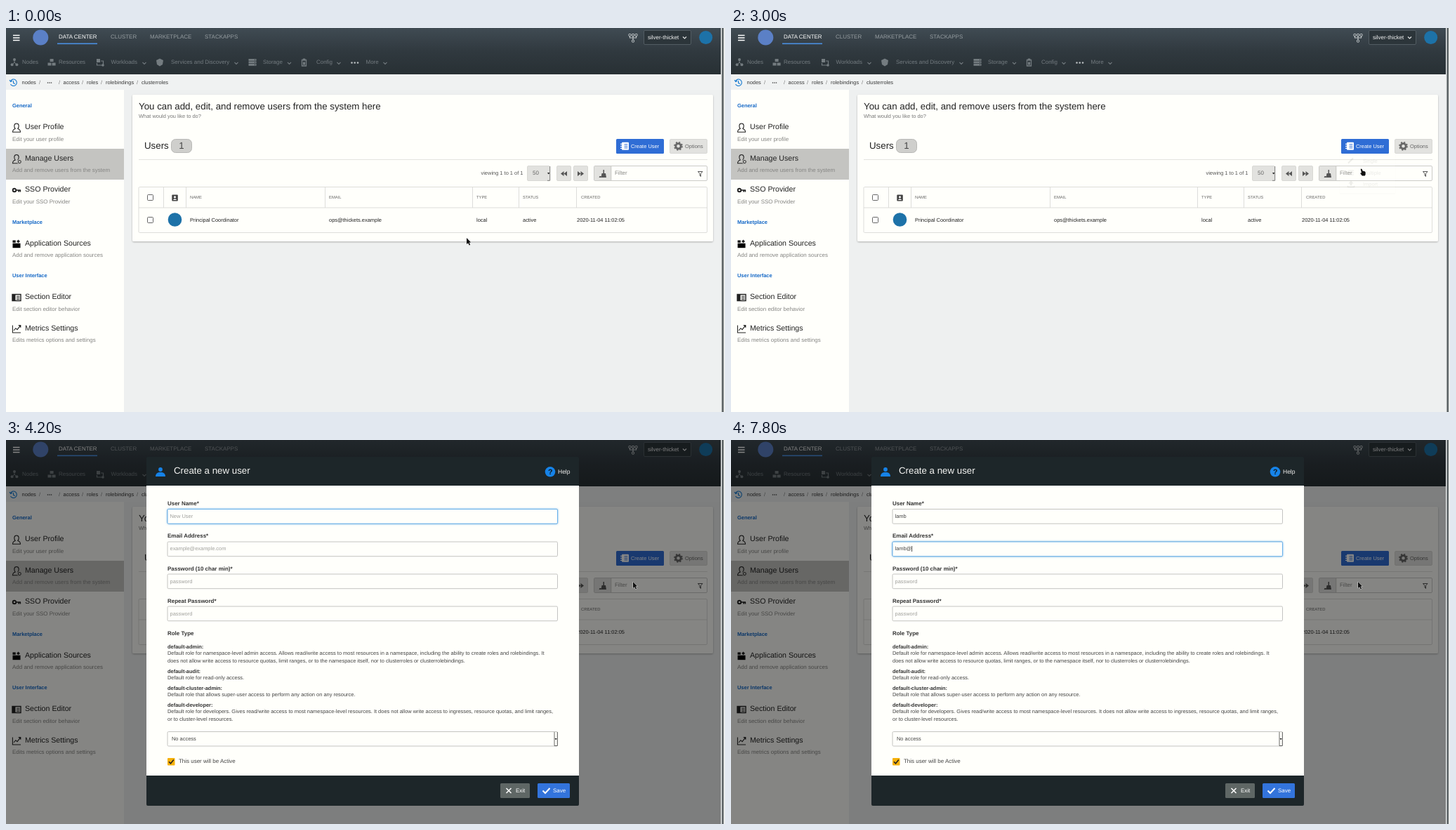
Animation, 1024 px wide and 547 px high, one loop 8000 ms. Source, as an HTML page:

```html
<!DOCTYPE html>
<html lang="en">
<head>
<meta charset="utf-8">
<title>User administration</title>
<style>
html, body { margin: 0; width: 100%; height: 100%; overflow: hidden; background: #eef0f0; }
svg { display: block; width: 1024px; height: 547px; }
text { font-family: "Liberation Sans", Arial, sans-serif; text-rendering: geometricPrecision; white-space: pre; }
</style>
</head>
<body>
<svg id="stage" viewBox="0 0 1024 547" xmlns="http://www.w3.org/2000/svg"></svg>
<script>
const LOOP = 8000;
const S = 7.45, M = 7.98, L = 10.64, XL = 13.3;
const INK = '#222', GREY = '#858583', PAPER = '#fffffb', BLUE = '#1468c7';

const text = (x, y, s, size = S, fill = INK, extra = '') =>
  `<text x="${x}" y="${y}" font-size="${size}" fill="${fill}" ${extra}>${s}</text>`;
const bold = (x, y, s, size = S, fill = INK) => text(x, y, s, size, fill, 'font-weight="700"');
const rect = (x, y, w, h, fill, extra = '') =>
  `<rect x="${x}" y="${y}" width="${w}" height="${h}" fill="${fill}" ${extra}/>`;
const box = (x, y, w, h, stroke = '#c6c6c3', fill = 'none', r = 1.5) =>
  rect(x, y, w, h, fill, `rx="${r}" stroke="${stroke}" stroke-width=".9"`);
const line = (d, stroke = INK, w = 1, extra = '') =>
  `<path d="${d}" fill="none" stroke="${stroke}" stroke-width="${w}" ${extra}/>`;
const fill = (d, color = INK) => `<path d="${d}" fill="${color}"/>`;
const dot = (x, y, r, color = INK) => `<circle cx="${x}" cy="${y}" r="${r}" fill="${color}"/>`;
const at = (x, y, s) => `<g transform="translate(${x} ${y})">${s}</g>`;
const chevron = (x, y, c) => line(`M${x - 2.5} ${y - 1.2}l2.5 2.5l2.5-2.5`, c, 1.2);
const person = c => dot(0, -3, 2.9, c) + fill('M-7 7Q-7 2-2 1H2Q7 2 7 7Z', c);
const personLine = line('M-5.5 6.3Q-5.5 2.6-1.8 1.5Q-3.4-.6-3.2-3Q-2.8-6 0-6Q2.8-6 3.2-3Q3.4-.6 1.8 1.5Q5.5 2.6 5.5 6.3Z', INK, 1.1);
const gear = c => `<circle r="3.7" fill="none" stroke="${c}" stroke-width="2.8"/>` +
  `<circle r="5.6" fill="none" stroke="${c}" stroke-width="1.6" stroke-dasharray="2.2 2.2"/>`;
const listIcon = (c, back) => rect(-4, -5.5, 10, 11, c, 'rx="1"') +
  line('M-6-3H-3M-6 0H-3M-6 3H-3', c, 1.3) + line('M-.5-2.5H4.3M-.5 0H4.3M-.5 2.5H4.3', back, 1);

function header() {
  const nav = '#747c80';
  const tabs = [[149, 'CLUSTER'], [205, 'MARKETPLACE'], [283, 'STACKAPPS']];
  const items = [[23, 'Nodes'], [75, 'Resources'], [149.5, 'Workloads', 197], [235, 'Services and Discovery', 328],
    [366, 'Storage', 403.5], [442, 'Config', 474], [512.5, 'More', 540]];
  return rect(0, 0, 1018, 66, 'url(#bar)') +
    line('M10 10.5h9.5M10 14h9.5M10 17.5h9.5', '#fff', 1.6) +
    dot(49.3, 13.5, 11, '#5b80c6') +
    text(75, 15.3, 'DATA CENTER', M, '#fff') + rect(73, 21.5, 57, 1.6, '#4a90e2') +
    tabs.map(([x, s]) => text(x, 15.3, s, M, '#969da1')).join('') +
    items.map(([x, s, c]) => text(x, 51.3, s, M, nav) + (c ? chevron(c, 50, nav) : '')).join('') +
    at(12, 49, line('M0-4V0M-3 3L0 0L3 3', nav, 1) + dot(0, -4, 2, nav) + dot(-3.4, 3.2, 2, nav) + dot(3.4, 3.2, 2, nav)) +
    at(65, 49, rect(-2.4, -5, 5, 4, nav) + rect(-5.5, .5, 5, 4, nav) + rect(.6, .5, 5, 4, nav)) +
    at(134, 49, rect(-5, -5, 5, 5, nav) + line('M-4.5 1V4H4.5V-2H1', nav, 1.2) + dot(4, 4, 1.8, nav)) +
    at(219, 49, fill('M-5-3L0-5.5L5-3L4 3L0 5.5L-4 3Z', nav)) +
    at(351, 49, [-5, -1.5, 2].map(y => rect(-5.5, y, 11, 2.8, nav) + dot(3.5, y + 1.4, .7, '#2d3438')).join('')) +
    at(424.5, 49, line('M-3-3.5H3V5H-3Z', nav, 1.3) + rect(-1.7, -5.5, 3.4, 3, nav) + rect(-1.5, -.5, 3, 4, nav)) +
    [492.5, 496.7, 501].map(x => dot(x, 49.5, 1.3, '#b8bdbf')).join('') +
    at(893, 14, line('M0 5V0M-4.6-3.4V0H4.6V-3.4', '#c5cacc', 1.1) +
      [[-4.6, -4], [0, -4], [4.6, -4], [0, 4.6]].map(([x, y]) => box(x - 1.5, y - 1.5, 3, 3, '#c5cacc', '#39434a', .5)).join('') +
      line('M0-2.5V0', '#c5cacc', 1.1)) +
    box(908.5, 3.5, 67, 20, '#566067', '#2c353a') + text(914, 15.6, 'silver-thicket', M, '#f2f3f3') + chevron(966.5, 13.7, '#e2e4e4') +
    dot(996.7, 13.5, 9.5, '#1d72a8');
}

function crumbs() {
  const parts = [[22.5, 'nodes'], [47, '/'], [75, '/'], [81.5, 'access'], [108, '/'], [115, 'roles'],
    [135, '/'], [142, 'rolebindings'], [186, '/'], [193, 'clusterroles']];
  return rect(0, 66, 1018, 22, '#f0f2f2') +
    line('M6.5 75.5A4.7 4.7 0 1 1 6.5 80M10.5 75V78.3L12.8 79.5M5 74L6.6 76.5L9 75.2', '#1479d0', 1.1) +
    parts.map(([x, s]) => text(x, 79.7, s, S, s === '/' ? '#777' : '#3a3a3a')).join('') +
    [59.5, 62, 64.5].map(x => dot(x, 78, .8, '#333')).join('');
}

function sidebar() {
  const rows = [[141, 'User Profile', 'Edit your user profile'],
    [185.5, 'Manage Users', 'Add and remove users from the system'],
    [230, 'SSO Provider', 'Edit your SSO Provider'],
    [306.5, 'Application Sources', 'Add and remove application sources'],
    [383, 'Section Editor', 'Edit section editor behavior'],
    [427.5, 'Metrics Settings', 'Edits metrics options and settings']];
  const active = '#c4c4c1';
  const icons = [personLine,
    personLine + dot(4.3, 4, 3.2, active) + `<circle cx="4.3" cy="4" r="2" fill="none" stroke="#222"/>`,
    line('M-1 0H6M3 0V2.5M5.3 0V2.5', INK, 1.7) + `<circle cx="-3" r="2.3" fill="none" stroke="#222" stroke-width="1.9"/>`,
    rect(-5.5, -.8, 11, 6.5) + rect(-5.5, -5, 4.2, 3.2) + fill('M2.5-6L5-3.6L2.5-1.2L0-3.6Z'),
    line('M-6-4.5H6V4.5H-6Z', INK, 1.4) + rect(-6, -4.5, 4.5, 9, INK) + line('M0-1.8H4.5M0 .3H4.5M0 2.4H4.5'),
    line('M-5.6-5V5.5H6M-4 2.5L-1.2-.8L1 1.2L5.5-4.6M2.7-4.9H5.8V-1.8', INK, 1.1)];
  return rect(0, 88, 168, 459, PAPER) + rect(0, 172, 168, 44, active) +
    [[113.2, 'General'], [278.5, 'Marketplace'], [355, 'User Interface']].map(([y, s]) => bold(9, y, s, S, BLUE)).join('') +
    rows.map(([y, a, b], i) => at(15, y + 1, icons[i]) + text(27, y + 3.1, a, L) + text(9, y + 19.8, b, M, GREY)).join('');
}

function card() {
  const head = '#666', cols = [224.5, 256.5, 454.5, 664.5, 730.5, 812.5];
  const heads = [[262, 'NAME'], [460, 'EMAIL'], [670, 'TYPE'], [736, 'STATUS'], [819, 'CREATED']];
  const cells = [[262, 'Principal Coordinator'], [460, 'ops@thickets.example'], [670, 'local'], [736, 'active'],
    [813, '2020-11-04 11:02:05']];
  const check = y => box(201.5, y, 8, 8, '#555', '#fff', 1);
  const button = (x, y, w, h) => box(x, y, w, h, '#d6d6d3', '#e2e2df');
  return rect(180, 95, 827, 209, PAPER, 'rx="2" filter="url(#soft)"') +
    text(189, 115.6, 'You can add, edit, and remove users from the system here', XL) +
    text(189, 128.4, 'What would you like to do?', S, '#777') +
    text(197, 171.5, 'Users', XL) + box(235.5, 158.5, 29, 19, '#b4b4b2', '#cfcfcc', 6) +
    text(250, 171.5, '1', XL, '#444', 'text-anchor="middle"') +
    rect(869, 158, 68, 21, '#2f6dd5', 'rx="1.5"') + at(881, 168.3, listIcon('#fff', '#2f6dd5')) + text(890, 170.6, 'Create User', S, '#fff') +
    button(945.5, 158.5, 53, 20) + at(957.5, 168.3, gear('#666')) + text(967, 170.6, 'Options', S, '#666') +
    line('M189 187.5H999', '#dcdcd9', .8) +
    text(676.5, 209, 'viewing 1 to 1 of 1', S, '#555') +
    button(742.5, 196.5, 32, 21) + text(750, 209.4, '50', M, '#666') + line('M771 217.3H774.7V197', '#666', .8) + fill('M771 206h3.4l-1.7 2.4Z') +
    button(784.5, 196.5, 20, 21) + fill('M794.5 204V211L790 207.5ZM799 204V211L794.5 207.5Z', '#555') +
    button(808.5, 196.5, 20, 21) + fill('M814 204V211L818.5 207.5ZM818.5 204V211L823 207.5Z', '#555') +
    box(837.5, 196.5, 161, 21, '#c6c6c3', PAPER) + rect(838, 197, 24, 20, '#e2e2df') + line('M861.8 197V217', '#c6c6c3') +
    fill('M850.5 202H852V207H854L855 213H847.5L848.5 207H850.5ZM844.5 213l1-2h2v2Z', '#555') +
    text(867, 209.4, 'Filter', M, '#8a8a88') +
    line('M985.5 204.5H992L989.5 207.5V211.5L988 210V207.5Z', '#555', 1) +
    box(189, 226.5, 809.5, 65, '#dadad7') + line('M189 256H998.5', '#dadad7', .9) +
    line(cols.map(x => `M${x} 226.5V256`).join(''), '#dadad7', .9) +
    check(237.5) + check(269.5) +
    rect(236.3, 237.5, 8.5, 9, '#444', 'rx="1"') + dot(240.5, 240.8, 1.5, '#fff') + fill('M237.8 245Q240.5 241.5 243.2 245Z', '#fff') +
    heads.map(([x, s]) => text(x, 243, s, 5.85, head)).join('') +
    dot(240.5, 273, 9.8, '#1d72a8') +
    cells.map(([x, s]) => text(x, 275.6, s)).join('');
}

function menu() {
  const ink = '#555';
  const rows = [[189.5, 'Single', line('M-4 3L3-4', ink, 2)],
    [206, 'Multiple', line('M-4-3H4M-4 0H4M-4 3H4', ink, 1.2)],
    [222.5, 'Import', fill('M0-5L3.5-1H1.3V2H-1.3V-1H-3.5Z', ink) + line('M-4.5 2V4H4.5V2', ink, 1.2)]];
  return rect(867, 180, 79, 55, PAPER, 'rx="1.5" filter="url(#soft)"') +
    rows.map(([y, s, icon]) => at(883, y, icon) + text(900, y + 2.6, s, S, ink)).join('');
}

function modal() {
  const dark = '#1d2629';
  const labels = [[93.3, 'User Name*'], [139.4, 'Email Address*'], [185.8, 'Password (10 char min)*'], [232, 'Repeat Password*'], [278, 'Role Type']];
  const roles = [[296.6, 'default-admin:'], [331.8, 'default-audit:'], [356, 'default-cluster-admin:'], [380.2, 'default-developer:']];
  const notes = [
    [305.8, 'Default role for namespace-level admin access. Allows read/write access to most resources in a namespace, including the ability to create roles and rolebindings. It'],
    [316.9, 'does not allow write access to resource quotas, limit ranges, or to the namespace itself, nor to clusterroles or clusterrolebindings.'],
    [341, 'Default role for read-only access.'],
    [365.1, 'Default role that allows super-user access to perform any action on any resource.'],
    [389.2, 'Default role for developers. Gives read/write access to most namespace-level resources. It does not allow write access to ingresses, resource quotas, and limit ranges,'],
    [400.4, 'or to cluster-level resources.']];
  return rect(200, 24, 616, 497, dark, 'rx="2"') + rect(200, 65, 616, 413, PAPER) +
    at(220, 45, person('#1683e8')) + text(239, 48.2, 'Create a new user', XL, '#f4f4f2') +
    dot(775, 45.3, 7.3, '#1683e8') + bold(772, 49.2, '?', 10.64, '#10181b') + text(786, 48.3, 'Help', 8.51, '#f4f4f2') +
    labels.map(([y, s]) => bold(230, y, s, M, '#333')).join('') +
    [98.5, 145, 191, 237].map(y => box(230, y, 555.5, 20.7, '#bebebb', PAPER)).join('') +
    '<g id="focus"><rect x="230" y="98.5" width="555.5" height="20.7" rx="1.5" fill="#fffffb" stroke="#66afe9" filter="url(#glow)"/></g>' +
    text(233.5, 111.2, '', S, INK, 'id="name"') + text(233.5, 157.4, '', S, INK, 'id="mail"') +
    [203.6, 249.6].map(y => text(233.5, y, 'password', S, '#a0a09d')).join('') +
    rect(0, 105, .8, 8, '#222', 'id="caret"') +
    roles.map(([y, s]) => bold(230, y, s, S, '#333')).join('') +
    notes.map(([y, s]) => text(230, y, s, S, '#444')).join('') +
    box(230, 415.5, 555.5, 20.5, '#bebebb', PAPER) + text(236, 428, 'No access', S, '#444') +
    line('M781 416V435.5H785.3V416', '#444', .8) + fill('M781.5 425h3.2l-1.6 2.2Z') +
    rect(230, 453, 10.5, 10.5, '#f6b10a', 'rx="1"') + line('M232 458.2L234.5 460.8L238.8 455.5', '#222', 1.5) +
    text(246, 460.4, 'This user will be Active', M, '#444') +
    rect(704, 489, 42, 21, '#5f6765', 'rx="1.5"') + line('M712.5 496L719.5 503M719.5 496L712.5 503', '#fff', 1.5) + text(726, 502, 'Exit', M, '#fff') +
    rect(757, 489, 46, 21, '#3374dc', 'rx="1.5"') + line('M764.5 499.5L768 503L774.5 496', '#fff', 2) + text(779, 502, 'Save', M, '#fff');
}

document.getElementById('stage').innerHTML = `<defs>
  <linearGradient id="bar" x2="0" y2="1"><stop stop-color="#404b53"/><stop offset=".5" stop-color="#30393f"/><stop offset="1" stop-color="#283034"/></linearGradient>
  <filter id="soft" x="-10%" y="-10%" width="120%" height="130%"><feDropShadow dx="0" dy="1" stdDeviation="1.3" flood-opacity=".28"/></filter>
  <filter id="glow" x="-2%" y="-30%" width="104%" height="160%"><feDropShadow dx="0" dy="0" stdDeviation="1.5" flood-color="#66afe9" flood-opacity=".8"/></filter>
  </defs>` +
  rect(0, 0, 1024, 547, '#eef0f0') + crumbs() + sidebar() + card() + header() +
  `<g id="menu">${menu()}</g>` + rect(0, 0, 1018, 547, '#000', 'id="shade"') + `<g id="modal">${modal()}</g>` +
  rect(1018, 0, 6, 547, '#e6e8e8') + rect(1019.5, 0, 2.5, 547, '#596062') +
  `<g id="arrow">${line('M0 0V9L2.1 7.2L3.7 10.6L5.2 9.9L3.7 6.6H6.3Z', '#fff', 1, 'opacity=".8"')}${fill('M0 0V9L2.1 7.2L3.7 10.6L5.2 9.9L3.7 6.6H6.3Z', '#111')}</g>` +
  `<g id="hand">${fill('M-1.3 0Q-.3-1.2.6 0L1.8 2.7Q5 2.4 5.6 4.2L5.7 7.6L4.8 9.5H.8L-1.7 6.3Q-1.8 5 0 5.5Z', '#111')}</g>`;

const el = Object.fromEntries([...document.querySelectorAll('g[id], rect[id], text[id]')].map(n => [n.id, n]));

// Each track: [start ms, values...], held until the next entry
const pointer = [[0, 656, 299], [100, 667, 297], [200, 676, 295], [700, 800, 270], [800, 987, 240], [900, 930, 223],
  [1100, 862, 197, 1], [1200, 870, 186], [1300, 881, 175, 1], [1400, 893, 166, 1], [1500, 905, 160, 1],
  [1900, 913, 166, 1], [2000, 921, 172, 1], [2200, 895, 172, 1], [2400, 930, 186, 1], [2500, 898, 201, 1],
  [3100, 898, 201], [4100, 895, 201], [4200, 893, 202]];
const menuFade = [[0, 0], [1700, .25], [1800, .6], [1900, .9], [2000, 1], [2900, .5], [3000, .1], [3100, 0]];
const modalFade = [[0, 0, 0], [3100, .25, .13], [3200, .965, .47], [3300, 1, .48]];
const nameKeys = [[0, 0], [4600, 1], [4900, 2], [5100, 4]];
const mailKeys = [[0, 0], [6500, 1], [6800, 2], [6900, 3], [7000, 4], [7800, 5]];
const caretOn = [[0, 1], [4100, 0], [4600, 1], [5400, 0], [5600, 1]];
const hold = (track, t) => track.filter(k => k[0] <= t).pop().slice(1);

function field(node, value, hint) {
  node.textContent = value || hint;
  node.setAttribute('fill', value ? '#444' : '#a0a09d');
}

function draw(t) {
  const [x, y, hand] = hold(pointer, t);
  el.arrow.setAttribute('opacity', hand ? 0 : 1);
  el.hand.setAttribute('opacity', hand ? 1 : 0);
  for (const n of [el.arrow, el.hand]) n.setAttribute('transform', `translate(${x} ${y})`);

  el.menu.setAttribute('opacity', hold(menuFade, t)[0]);
  const [panel, shade] = hold(modalFade, t);
  el.modal.setAttribute('opacity', panel);
  el.shade.setAttribute('opacity', shade);

  const name = 'lamb'.slice(0, hold(nameKeys, t)[0]);
  const mail = 'lamb@'.slice(0, hold(mailKeys, t)[0]);
  field(el.name, name, 'New User');
  field(el.mail, mail, 'example@example.com');
  const second = t >= 5600;
  el.focus.setAttribute('transform', `translate(0 ${second ? 46.5 : 0})`);
  const typed = second ? mail : name;
  const width = typed ? (second ? el.mail : el.name).getComputedTextLength() : 0;
  el.caret.setAttribute('x', 233.6 + width);
  el.caret.setAttribute('y', second ? 151 : 105);
  el.caret.setAttribute('opacity', hold(caretOn, t)[0]);
}

const start = performance.now();
function tick() {
  draw((performance.now() - start) % LOOP);
  requestAnimationFrame(tick);
}
tick();
</script>
</body>
</html>
```
